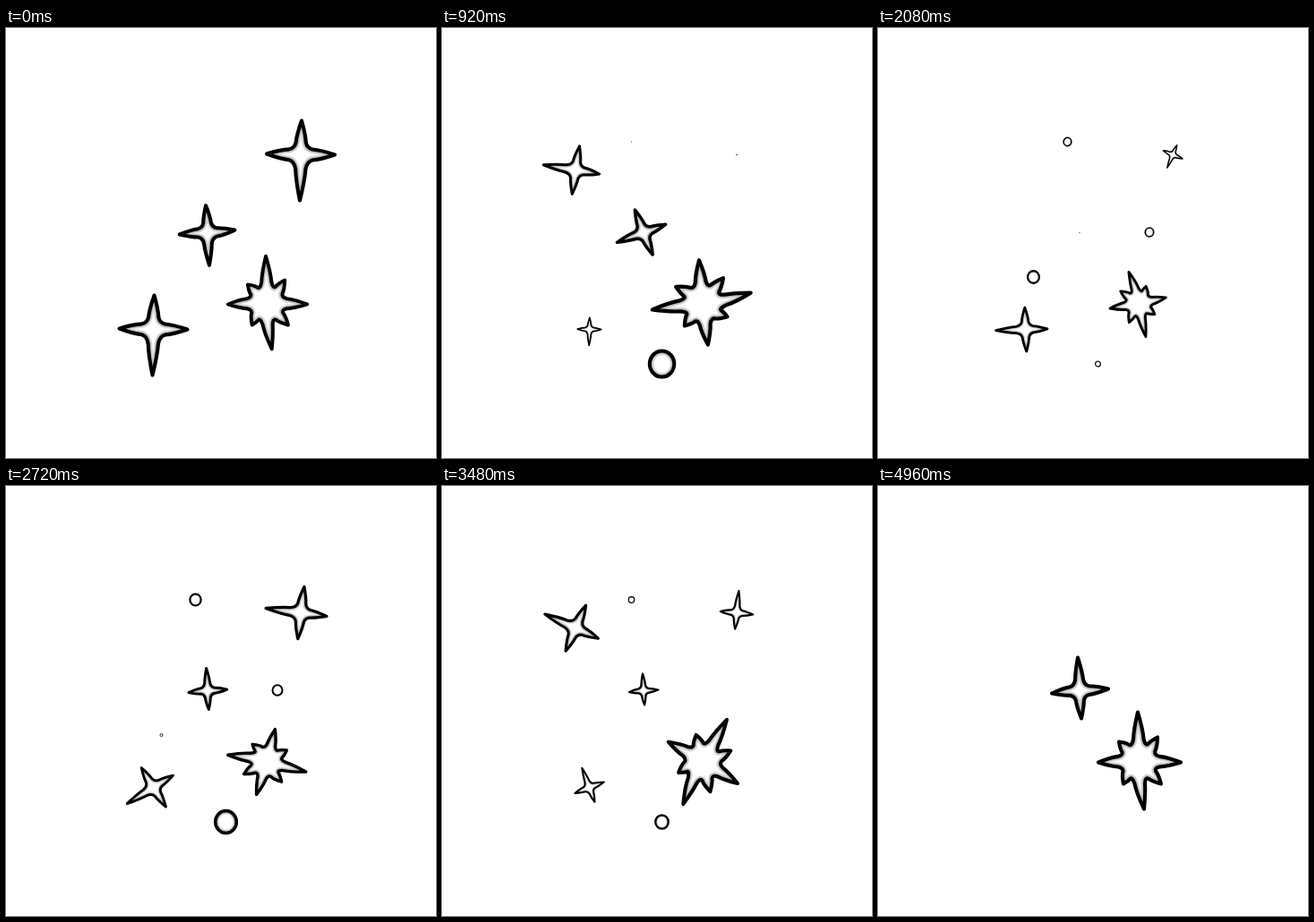
These frames come from a looping animation (480 px wide and 480 px high, 5000 ms). An HTML page with a canvas:

```html
<!DOCTYPE html>
<html lang="en">
<head>
<meta charset="utf-8">
<title>Twinkling stars</title>
<style>
  html, body { margin: 0; width: 100%; height: 100%; overflow: hidden; background: #fff; }
  canvas { display: block; width: 100vmin; height: 100vmin; }
</style>
</head>
<body>
<canvas id="stage" width="480" height="480"></canvas>
<script>
const LOOP = 5000, STEP = 40, DOT_RADIUS = 16.5, DOT_RISE = 200;
const ctx = document.getElementById('stage').getContext('2d');

const mix = (a, b, k) => a + (b - a) * k;
const mixPoint = (p, q, k) => [mix(p[0], q[0], k), mix(p[1], q[1], k)];

// Middle of an arm's edge, pushed away from the arm's axis so the arm bulges a little.
function bulge(tip, valley) {
  const mid = mixPoint(valley, tip, 0.5);
  const along = (mid[0] * tip[0] + mid[1] * tip[1]) / (tip[0] ** 2 + tip[1] ** 2);
  return mixPoint([tip[0] * along, tip[1] * along], mid, 1.4);
}

// Tips run clockwise; valleyAt(i) is the corner after tip i.
function starPath(tips, valleyAt) {
  const path = new Path2D();
  path.moveTo(...tips[0]);
  tips.forEach((tip, i) => {
    const next = tips[(i + 1) % tips.length], valley = valleyAt(i);
    path.quadraticCurveTo(...bulge(tip, valley), ...mixPoint(valley, tip, 0.2));
    path.quadraticCurveTo(...valley, ...mixPoint(valley, next, 0.2));
    path.quadraticCurveTo(...bulge(next, valley), ...next);
  });
  path.closePath();
  return path;
}

function ring(count, rx, ry) {
  return i => {
    const a = (i + 0.5) / count * Math.PI * 2;
    return [Math.sin(a) * rx, -Math.cos(a) * ry];
  };
}

const four = starPath([[1, -38], [38, 0], [-1, 51], [-38, -1]], ring(4, 10, 10.5));
const small = starPath([[-2, -37], [32, -2], [2, 31], [-31, 3]], ring(4, 8, 8.5));
const eight = starPath([[-1, -55], [21, -27], [47, 1], [25, 25], [6, 53], [-17, 25], [-45, 1], [-22, -22]], ring(8, 19, 19));
const dot = new Path2D();
dot.ellipse(0, 0, 13.9, 14.7, 0, 0, Math.PI * 2);

// A pop grows to size at peak and shrinks to nothing at end; spin is in degrees per second.
const spinning = (start, peak, end, size, spin) => ({ start, peak, end, size, spin, spinFrom: start });
const upright = (start, peak, end, size, spin) => ({ start, peak, end, size, spin, spinFrom: peak });
const dotPop = (start, end) => upright(start, start + DOT_RISE, end, 1, 0);

function popPose(pops, t) {
  const p = pops.filter(p => p.start <= t).pop();
  if (!p || t >= p.end) return [0, 0];
  const grow = t < p.peak ? (t - p.start) / (p.peak - p.start) : (p.end - t) / (p.end - p.peak);
  return [p.size * grow, p.spin * Math.max(0, t - p.spinFrom) / 1000];
}

// Keys are [time, scale, degrees].
function keyPose(keys, t) {
  const i = keys.findIndex(k => k[0] > t);
  if (i < 0) return keys[keys.length - 1].slice(1);
  const a = keys[i - 1], b = keys[i], k = (t - a[0]) / (b[0] - a[0]);
  return [mix(a[1], b[1], k), mix(a[2], b[2], k)];
}

const shapes = [
  { path: four, x: 329, y: 141.5, pops: [
    upright(-1, 0, 940, 1, 116), upright(940, 1350, 1880, 0.78, 116), spinning(1890, 2430, 4740, 0.88, 116)] },
  { path: four, x: 149, y: 158.5, pops: [
    spinning(75, 920, 1150, 0.71, 116), upright(1150, 1600, 1850, 1.15, 116),
    spinning(2900, 3500, 3700, 0.76, 195), upright(3700, 4200, 4470, 1, 116)] },
  { path: small, x: 225, y: 228.5, keys: [
    [0, 0.98, 180], [920, 0.85, 253], [2100, 0, 346], [2720, 0.68, 360], [3540, 0.5, 360], [4960, 1, 360]] },
  { path: four, x: 164.5, y: 336.5, pops: [
    upright(-1, 0, 420, 1, 116), upright(420, 1850, 2500, 1, 378), spinning(2290, 2850, 4160, 0.88, 133)] },
  { path: eight, x: 291, y: 307.5, keys: [
    [0, 0.96, 0], [920, 1.03, -96], [2080, 0.69, -191], [3480, 0.98, -329], [3870, 0, -360], [4960, 1, -360]] },
  { path: dot, x: 211.5, y: 127, pops: [dotPop(915, 2530), dotPop(2630, 3680), dotPop(3975, 4830)] },
  { path: dot, x: 303, y: 228, pops: [dotPop(1300, 2380), dotPop(2640, 3380)] },
  { path: dot, x: 173.5, y: 278, pops: [dotPop(930, 2920)] },
  { path: dot, x: 245.5, y: 375, pops: [dotPop(700, 2390), dotPop(2550, 3370), dotPop(3375, 4900)] }
];

function drawShape({ path, x, y }, [scale, degrees]) {
  if (scale < 0.01) return;
  ctx.save();
  ctx.translate(x, y);
  ctx.rotate(degrees * Math.PI / 180);
  ctx.scale(scale, scale);
  ctx.fillStyle = '#fff';
  ctx.fill(path);
  // soft shade just inside the outline
  ctx.save();
  ctx.clip(path);
  ctx.strokeStyle = 'rgba(0,0,0,.06)';
  for (let w = 5; w <= 10; w++) {
    ctx.lineWidth = w;
    ctx.stroke(path);
  }
  ctx.restore();
  ctx.strokeStyle = '#000';
  ctx.lineWidth = 3.8 + 0.3 / scale;
  ctx.stroke(path);
  ctx.restore();
}

function draw(t) {
  ctx.fillStyle = '#fff';
  ctx.fillRect(0, 0, 480, 480);
  ctx.lineJoin = 'round';
  for (const s of shapes) drawShape(s, s.keys ? keyPose(s.keys, t) : popPose(s.pops, t));
}

const start = performance.now();
function tick() {
  const t = (performance.now() - start) % LOOP;
  draw(Math.floor(t / STEP) * STEP);
  requestAnimationFrame(tick);
}
tick();
</script>
</body>
</html>
```
